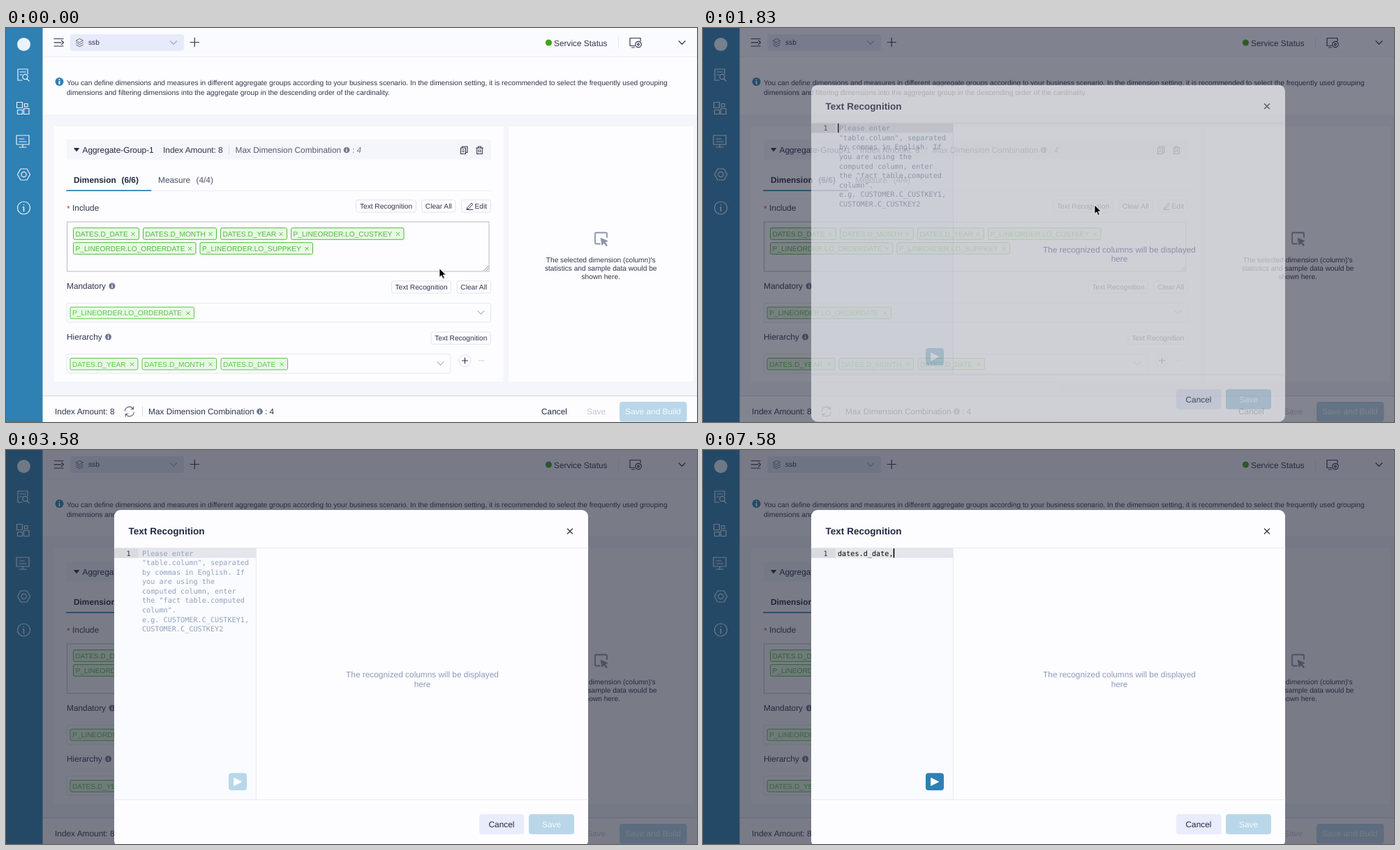
Animation, 990 px wide and 565 px high, one loop 8 s. Source, as an HTML page:

```html
<!DOCTYPE html>
<html lang="en">
<head>
<meta charset="utf-8">
<title>Text Recognition</title>
<style>
html, body { margin: 0; width: 100%; height: 100%; overflow: hidden; background: #fdfdff; }
svg { display: block; width: 990px; height: 565px; }
text { font-family: "Liberation Sans", Arial, sans-serif; text-rendering: geometricPrecision; white-space: pre; }
.mono { font-family: "DejaVu Sans Mono", monospace; }
</style>
</head>
<body>
<svg id="stage" viewBox="0 0 990 565"></svg>
<script>
const S = 10.18, M = 11.87, L = 13.57;            // font sizes
const INK = '#30354c', DARK = '#1f2742', BLUE = '#2f80b3', PALE = '#b9d7e9',
      LINE = '#e4e7f3', GREEN = '#4cbc38', MUTED = '#8d9abb';

const rect = (x, y, x2, y2, fill, stroke = 'none', r = 0, extra = '') =>
  `<rect x="${x}" y="${y}" width="${x2 - x}" height="${y2 - y}" rx="${r}" fill="${fill}" stroke="${stroke}" ${extra}/>`;
const path = (d, stroke, width = 1.2, fill = 'none') =>
  `<path d="${d}" fill="${fill}" stroke="${stroke}" stroke-width="${width}" stroke-linejoin="round" stroke-linecap="round"/>`;
const circle = (x, y, r, fill, stroke = 'none') =>
  `<circle cx="${x}" cy="${y}" r="${r}" fill="${fill}" stroke="${stroke}" stroke-width="1.2"/>`;
// y is the middle of the capitals
const text = (x, y, str, size = S, fill = INK, extra = '') =>
  `<text x="${x}" y="${y + size * 0.355}" font-size="${size}" fill="${fill}" ${extra}>${str}</text>`;
const middle = 'text-anchor="middle"', bold = 'font-weight="bold"';
const chevron = (x, y, color, w = 4.5) => path(`M${x - w} ${y - w / 2}l${w} ${w} ${w} ${-w}`, color);
const cross = (x, y, r, color, w) => path(`M${x - r} ${y - r}l${2 * r} ${2 * r}m0 ${-2 * r}l${-2 * r} ${2 * r}`, color, w);
const info = (x, y, r, fill) => circle(x, y, r, fill) +
  path(`M${x} ${y - r * 0.5}v.1M${x} ${y - r * 0.05}v${r * 0.55}`, '#fff', r * 0.32);
const button = (x, x2, y, label, id = '') =>
  rect(x + .5, y - 8.7, x2 - .5, y + 8.7, '#fdfdff', '#e0e3f0', 3, id) +
  text((x + x2) / 2, y, label, S, INK, middle);
const tag = (x, x2, y, label, color = GREEN) =>
  rect(x + .5, y - 8.3, x2 - .5, y + 8.3, '#e9f8e6', color, 2) +
  text(x + 3.5, y + .3, label, S, color) + cross(x2 - 9, y + .5, 2.2, color, 1);

function sidebar() {
  const w = '#e8f3fb';
  return rect(0, 0, 52.5, 565, BLUE) + circle(25.5, 23.5, 9.5, w) +
    path('M31 66v-7h-14v16h6M20 63h8M20 67h3', w) + circle(27.5, 70, 3.6, 'none', w) + path('M30 73l3 3', w) +
    path('M15.500 106.500h8v8h-8zM16.500 117.500h7v6h-7zM25.500 115.500h7.500v8h-7.500zM26.500 108.500h4.500v4.500h-4.500z', w) +
    path('M15 154h18v13h-18zM24 167v4M19 171h10M19 159h7M19 163h10', w) +
    path('M16.5 210l4.5-8h9l4.5 8-4.5 8h-9z', w) + circle(25.5, 210, 3.6, 'none', w) +
    circle(25.5, 258, 9, 'none', w) + path('M25.5 253.5v.1M24.5 257h1v6', w, 1.5);
}

function header() {
  return rect(52.5, 0, 990, 41, '#fafbff') + path('M53 41.5H990', '#eaecf5', 1) +
    path('M69 15.5h13M69 20.8h10M69 26h13M79.5 18l3 2.8-3 2.8', INK) +
    rect(92, 9, 255, 33, '#e6eafa', 'none', 4) +
    path('M100.5 18l5-2.7 5 2.7-5 2.7zM100.5 21l5 2.7 5-2.7M100.5 24l5 2.7 5-2.7', '#666d85', 1) +
    text(118, 20.7, 'ssb', S, INK) + chevron(240, 21, '#a4abc4') +
    path('M264 20.5h12.5M270.2 14.2v12.5', INK) +
    circle(777.5, 21, 4.6, '#3fa51c') + text(785, 21.3, 'Service Status', M) +
    path('M877.5 13v16', '#e3e6f1', 1) +
    path('M901 25.5h-7v-11h15v4M896.5 28h4', INK) + circle(906, 23.5, 4.2, '#fafbff', INK) + circle(906, 23.5, 1.3, 'none', INK) +
    chevron(968.5, 21, INK) +
    info(76.5, 77, 6, BLUE) +
    text(87, 78, 'You can define dimensions and measures in different aggregate groups according to your business scenario. In the dimension setting, it is recommended to select the frequently used grouping') +
    text(87, 92.5, 'dimensions and filtering dimensions into the aggregate group in the descending order of the cardinality.');
}

function group() {
  const low = '#5cc548';
  return rect(52.5, 124, 990, 527, '#f5f6fc') + rect(69, 141, 712.5, 507, '#fdfdff') + rect(720, 141, 985, 507, '#fdfdff') +
    rect(87, 160, 695, 188.5, '#f5f6fb') +
    path('M98 172.5h6.5l-3.25 4z', DARK, 1, DARK) + text(109.5, 174.3, 'Aggregate-Group-1', M, DARK) +
    text(225, 174.3, 'Index Amount: 8', M) + path('M319.5 168v13', '#d5d8e5', 1) +
    text(328.5, 174.3, 'Max Dimension Combination', M, '#555b72') + info(488, 175, 4.3, '#6f7892') +
    text(496, 174.3, ': <tspan font-style="italic">4</tspan>', M, '#777e95') +
    path('M651.5 172h7v8.5h-7zM653.5 172v-2h7.5v8.5h-2.5M653.5 175h3M653.5 177.5h3', INK, 1.1) +
    path('M673.5 172h10M676.5 172v-2h4v2M674.7 172v8.5h7.6v-8.5M677.3 174.5v3.5M679.7 174.5v3.5', INK, 1.1) +
    text(97, 218.2, 'Dimension', M, DARK, bold) + text(165.5, 218.2, '(6/6)', M, DARK, bold) +
    text(218, 218.2, 'Measure', M, '#4a5068') + text(272.5, 218.2, '(4/4)', M, '#4a5068') +
    path('M87 233.5H695', '#eaecf5', 1) + path('M87 233.2H207.5', BLUE, 1.8) +
    text(87, 259, '*', M, '#e0393e') + text(95, 258.2, 'Include', M) +
    button(501, 588, 255.3, 'Text Recognition', 'id="recog"') + button(595, 644.5, 255.3, 'Clear All') +
    button(652, 695, 255.3, '') + text(671.5, 255.3, 'Edit') +
    path('M661 257.5l6-6.5 1.8 1.7-6 6.5-2.2.5zM660 260.5h9', INK, 1) +
    rect(87.5, 278, 692, 349, '#fdfdff', '#b9bcc8') + path('M684.5 348l6.5-6.5M688 348l3-3', '#777', .9) +
    tag(96, 191, 295, 'DATES.D_DATE') + tag(196, 302, 295, 'DATES.D_MONTH') +
    tag(307, 403, 295, 'DATES.D_YEAR') + tag(408, 570.5, 295, 'P_LINEORDER.LO_CUSTKEY') +
    tag(96, 272.5, 316, 'P_LINEORDER.LO_ORDERDATE') + tag(277.5, 440, 316, 'P_LINEORDER.LO_SUPPKEY') +
    text(87, 369.7, 'Mandatory', M) + info(152, 370, 4.5, '#6f7892') +
    button(552, 638, 371.5, 'Text Recognition') + button(645.5, 695, 371.5, 'Clear All') +
    rect(87, 394.5, 694.5, 422, '#fdfdff', LINE, 3) + tag(91.5, 270, 408.5, 'P_LINEORDER.LO_ORDERDATE', low) +
    chevron(680.5, 408, '#b3b9cd') +
    text(87, 442.5, 'Hierarchy', M) + info(146.5, 443, 4.5, '#6f7892') +
    button(608.5, 695, 444.7, 'Text Recognition') +
    rect(87, 467.5, 637, 495, '#fdfdff', LINE, 3) +
    tag(91.5, 189.5, 481.8, 'DATES.D_YEAR', low) + tag(194.5, 302, 481.8, 'DATES.D_MONTH', low) +
    tag(307.5, 404, 481.8, 'DATES.D_DATE', low) + chevron(622.5, 481, '#b3b9cd') +
    circle(657.5, 477, 8.7, '#fdfdff', LINE) + path('M653.5 477h8M657.5 473v8', INK) +
    path('M677 477h8', '#ccd0de');
}

function aside() {
  const c = '#8d93a8';
  return path('M851 309.5h-5.5q-1.5 0-1.5-1.5v-13q0-1.5 1.5-1.5h14q1.5 0 1.5 1.5v5', c, 1.8) +
    path('M852.5 301.5l9.5 4-4 1.5 3.5 4.5-1.5 1-3.3-4.5-2.5 3z', c, 1, c) +
    ["The selected dimension (column)'s", 'statistics and sample data would be', 'shown here.']
      .map((s, i) => text(852.2, 332 + i * 12, s, S, INK, middle)).join('');
}

function footer() {
  return rect(52.5, 527, 990, 565, '#fdfdff') + path('M53 527.5H990', '#d3d6e2', 1) +
    text(70, 549.5, 'Index Amount: 8', M) +
    path('M170.5 549a6.3 6.3 0 0 1 11.5-3M183.3 551a6.3 6.3 0 0 1-11.5 3M182.5 543v3.5h-3.5M171.3 557v-3.5h3.5', '#555b72', 1.1) +
    path('M195.5 543v13', '#d5d8e5', 1) + text(204, 549.5, 'Max Dimension Combination', M) +
    info(363.5, 550, 4.4, '#6f7892') + text(371, 549.5, ': 4', M) +
    text(767, 550.2, 'Cancel', M, DARK) + text(832, 550.2, 'Save', M, '#c3c7d6') +
    rect(879, 536, 975.5, 564.5, PALE, 'none', 4) + text(927, 550.2, 'Save and Build', M, '#f6fbff', middle);
}

function modal() {
  const hint = ['Please enter', '"table.column", separated', 'by commas in English. If', 'you are using the', 'computed column, enter',
    'the "fact table.computed', 'column".', 'e.g. CUSTOMER.C_CUSTKEY1,', 'CUSTOMER.C_CUSTKEY2'];
  return rect(155, 86, 834, 569, '#fdfdff', 'none', 9) +
    text(175.5, 116.5, 'Text Recognition', L, DARK, bold) + cross(808, 116.5, 3.5, INK, 1.3) +
    rect(155, 141, 358.5, 501, '#f9fbff') + rect(155, 141, 358.5, 154.7, '#e5e6eb') + rect(155, 141, 189.5, 154.7, '#dadbe0') +
    path('M155 140.5H834M155 501.5H834M358.5 141V501', '#e6eaf5', 1) +
    text(172.5, 148, '1', S, '#333', 'class="mono"') +
    `<g id="hint">${hint.map((s, i) => text(195, 148 + i * 13.57, s, S, '#93a0bb', 'class="mono"')).join('')}</g>` +
    text(193, 148, '', S, '#000', 'class="mono" id="typed"') +
    rect(0, 141.2, 1.6, 154.5, '#000', 'none', 0, 'id="caret"') +
    rect(319, 463.3, 345, 488, PALE, 'none', 4, 'id="run"') + path('M327 470.5l10.5 5.3-10.5 5.3z', '#fff', 1, '#fff') +
    text(596.5, 321.7, 'The recognized columns will be displayed', M, MUTED, middle) + text(596.5, 335.3, 'here', M, MUTED, middle) +
    rect(678, 522.3, 742.5, 551, '#e8ecfb', 'none', 4) + text(710, 536.7, 'Cancel', M, DARK, middle) +
    rect(749, 522.3, 814, 551, PALE, 'none', 4) + text(781.5, 536.7, 'Save', M, '#f6fbff', middle);
}

document.getElementById('stage').innerHTML =
  rect(0, 0, 990, 565, '#fdfdff') + header() + group() + aside() + footer() + sidebar() +
  rect(0, 0, 990, 565, '#1e2234', 'none', 0, 'id="shade"') + `<g id="modal">${modal()}</g>` +
  `<g id="arrow">${path('M0 0v12.5l2.9-2.7 2.2 4.7 2.2-1-2.2-4.5h4z', '#fff', .8, '#000')}</g>` +
  `<g id="beam">${path('M-2.5-7.5q2 0 2.5 1.5 .5-1.5 2.5-1.5M0-6V6M-2.5 7.5q2 0 2.5-1.5 .5 1.5 2.5 1.5', '#333', 1)}</g>`;

const el = id => document.getElementById(id);
const set = (id, name, value) => el(id).setAttribute(name, value);
const show = (id, on) => set(id, 'visibility', on ? 'visible' : 'hidden');

const TICK = 1000 / 12;
const moves = [[0, 621, 345], [250, 617, 340], [333, 604, 322], [416, 587, 300], [583, 575, 278], [666, 563, 259], [750, 558, 252],
  [916, 558.5, 252], [1000, 559, 252.5], [1083, 559, 253], [1166, 560, 253], [1333, 561, 254],
  [2250, 470, 228], [2333, 380, 200], [2416, 315, 181], [2583, 300, 173], [2666, 285, 166], [2750, 276, 163]];
// one entry per typed character
const keys = [3666, 3750, 3916, 4083, 4250, 4916, 5416, 6333, 6500, 6666, 6916, 6916, 7583];
const phrase = 'dates.d_date,';

function caretOn(t) {
  return !(t >= 2250 && t < 2666 || t >= 3166 && t < 3666 || t >= 6083 && t < 6333);
}

function draw(now) {
  const t = Math.floor((now % 8000 + 4) / TICK) * TICK + .5;
  const u = Math.min(1, Math.max(0, (t - 1667) / 333));
  const easeOut = k => 1 - (1 - u) ** k;
  const p = easeOut(2.2);
  set('shade', 'opacity', .59 * easeOut(3.8));
  set('modal', 'opacity', p ** 1.9);
  set('modal', 'transform', `translate(0 ${-20 * (1 - p)})`);

  const [, x, y] = moves.filter(m => m[0] <= t).pop();
  set('arrow', 'transform', `translate(${x} ${y})`);
  set('beam', 'transform', `translate(${x} ${y})`);
  show('arrow', t < 2416);
  show('beam', t >= 2416 && t < 3000);
  set('recog', 'stroke', t >= 750 && t < 1700 ? '#6f9fc4' : '#e0e3f0');

  const n = keys.filter(k => k <= t).length;
  el('typed').textContent = phrase.slice(0, n);
  show('hint', n === 0);
  show('caret', caretOn(t));
  set('caret', 'x', 193 + n * S * .602);
  set('run', 'fill', n > 1 ? BLUE : n ? '#74acce' : PALE);
}

function frame() {
  draw(performance.now());
  requestAnimationFrame(frame);
}
frame();
</script>
</body>
</html>
```
